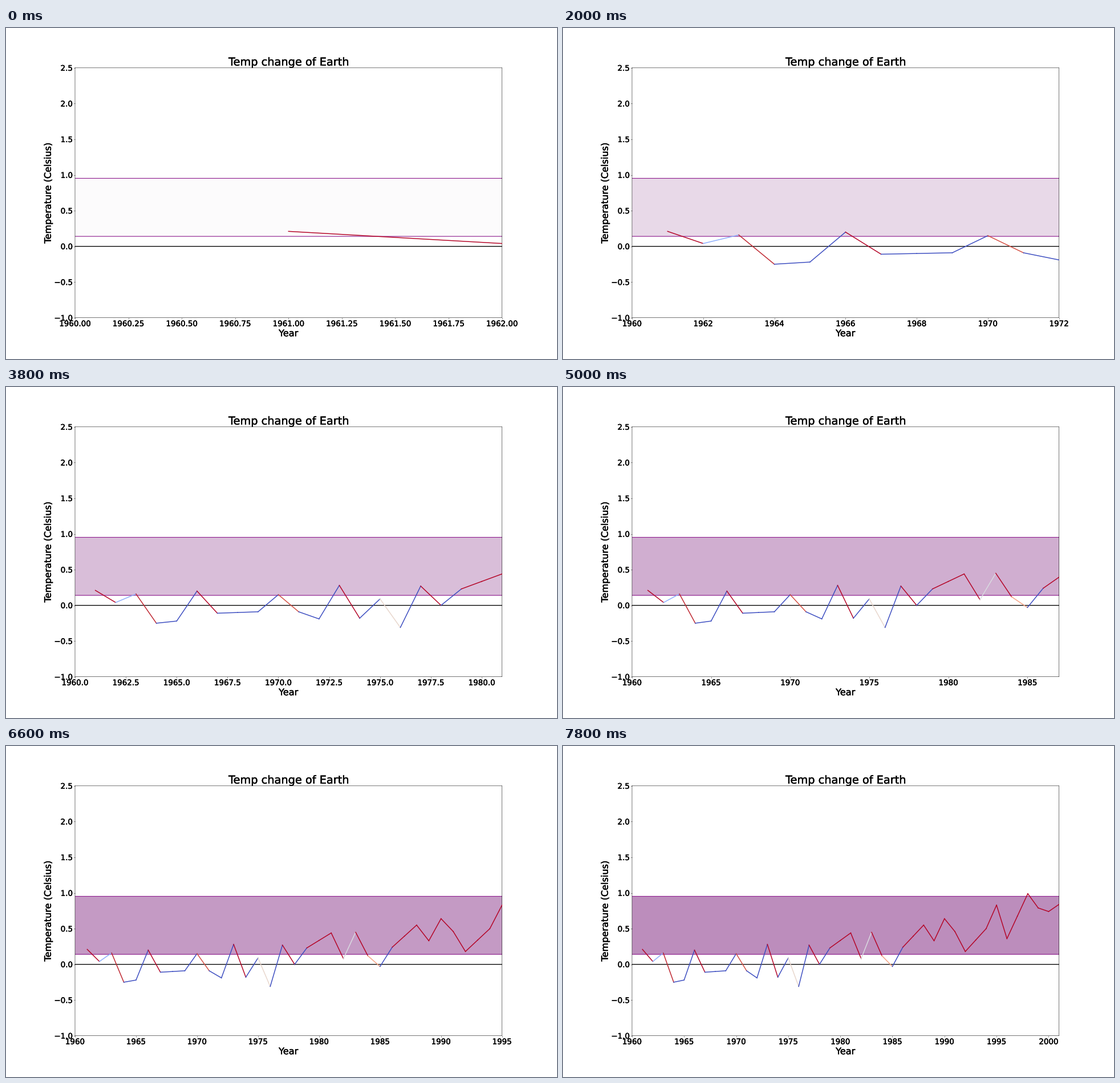
A matplotlib script for the animation above (8000 ms loop, 966x580 px).

```python
import numpy as np
import matplotlib.pyplot as plt
from matplotlib.animation import FuncAnimation
from matplotlib.collections import LineCollection
from matplotlib.patheffects import withStroke

DPI = 48.3
FIRST = 1960
FRAMES = 40
HEAVY = [withStroke(linewidth=0.7, foreground="black")]

plt.rcParams.update({"font.size": 24, "xtick.labelsize": 20,
                     "ytick.labelsize": 20, "ytick.major.pad": 2.5,
                     "axes.formatter.useoffset": False})

# Bends of the curve; the years left out lie on straight runs.
bend_years = np.r_[1961:1968, 1969:1980, 1981:1987,
                   1988:1993, 1994:1997, 1998:2002]
bends = [.21, .04, .16, -.25, -.22, .2, -.11,
         -.09, .15, -.09, -.19, .28, -.18, .09, -.31, .27, 0, .23,
         .44, .08, .45, .12, -.03, .24,
         .55, .33, .64, .46, .18, .5, .83, .36, .99, .79, .74, .84]
years = np.arange(1961, 2002)
temps = np.interp(years, bend_years, bends)

points = np.column_stack([years, temps])
segments = np.stack([points[:-1], points[1:]], axis=1)
# Each segment is coloured by the temperature it starts from.
colors = plt.cm.coolwarm(plt.Normalize(0, .165)(temps[:-1]))

fig = plt.figure(figsize=(966 / DPI, 580 / DPI), dpi=DPI, facecolor="white")
ax = fig.add_axes([.12525, .1246, .775, .755])
ax.set_ylim(-1, 2.5)
ax.set_title("Temp change of Earth")
ax.set_xlabel("Year")
ax.set_ylabel("Temperature (Celsius)")
ax.spines[:].set_snap(False)

band = ax.axhspan(.14, .945, color=(.42, 0, .42), lw=0, zorder=1)
for level, color, width in ((.14, "purple", 1.5), (.953, "purple", 1.5),
                            (0, "black", 2)):
    ax.axhline(level, color=color, lw=width, snap=False, zorder=2)
trace = ax.add_collection(
    LineCollection([], linewidths=2.2, capstyle="projecting", zorder=3))


def update(i):
    ax.set_xlim(FIRST, FIRST + 2 + i)
    # Another thin translucent layer is laid on the band at every step.
    band.set_alpha(1 - (1 - .0147) ** (i + 1))
    trace.set_segments(segments[:i + 1])
    trace.set_color(colors[:i + 1])
    for text in (ax.title, ax.xaxis.label, ax.yaxis.label,
                 *ax.get_xticklabels(), *ax.get_yticklabels()):
        text.set_path_effects(HEAVY)
    return band, trace


anim = FuncAnimation(fig, update, frames=FRAMES, interval=200,
                     init_func=lambda: update(0), repeat=True, repeat_delay=0)
plt.show()
```
